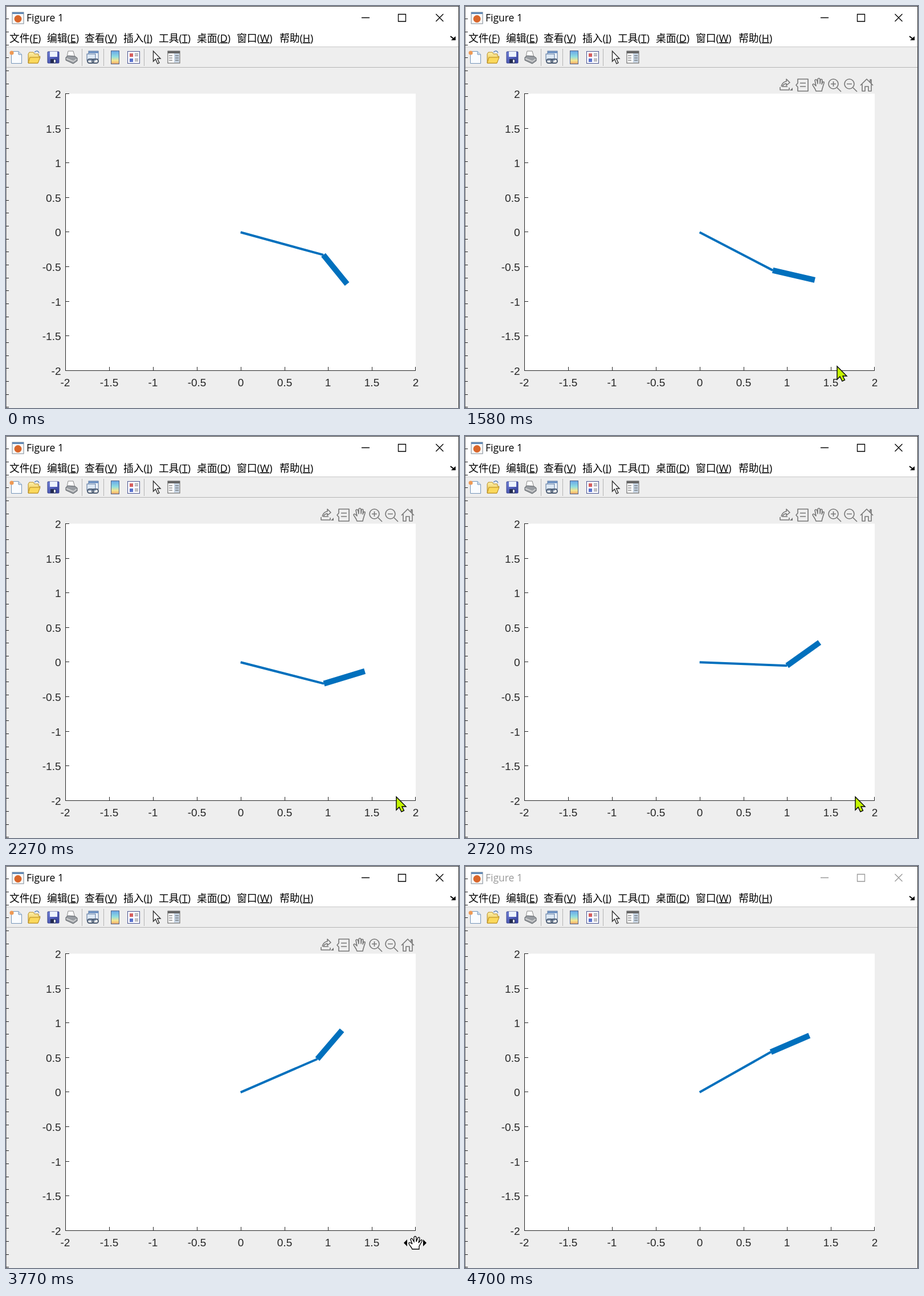
An HTML page that plays this animation: 795 by 704 pixels, repeating every 4.74 s.

```html
<!DOCTYPE html>
<html lang="zh">
<head>
<meta charset="utf-8">
<title>Figure 1</title>
<style>
html, body { margin: 0; width: 100%; height: 100%; overflow: hidden; background: #eee; }
svg { display: block; width: 795px; height: 704px; }
.ui { font: 17.8px "Open Sans", "Noto Sans CJK SC", "Noto Sans CJK", sans-serif; fill: #000; }
.tick text { font: 19px "Liberation Sans", Arial, sans-serif; fill: #262626; }
.u { text-decoration: underline; }
.line { fill: none; stroke: #262626; stroke-width: 1; shape-rendering: crispEdges; }
.arm { stroke: #0070bd; fill: none; }
#tools { fill: none; stroke: #777; stroke-width: 1.6; stroke-linejoin: round; }
#title { color: #000; }
#title.off { color: #999; }
</style>
</head>
<body>
<svg viewBox="0 0 795 704">
  <defs>
    <linearGradient id="bar" x2="0" y2="1">
      <stop stop-color="#68a5e8"/><stop offset=".45" stop-color="#8fdde0"/>
      <stop offset=".75" stop-color="#f8e58c"/><stop offset="1" stop-color="#eda265"/>
    </linearGradient>
    <linearGradient id="fold" x2="0" y2="1">
      <stop stop-color="#fff3ae"/><stop offset="1" stop-color="#e5b52f"/>
    </linearGradient>
    <linearGradient id="disk" x2="1" y2="1">
      <stop stop-color="#7181d8"/><stop offset="1" stop-color="#303b98"/>
    </linearGradient>
  </defs>

  <rect width="795" height="704" fill="#eee"/>
  <rect width="795" height="71" fill="#fff"/>
  <path d="M0 71.5H795" stroke="#c8c8c8"/>
  <path d="M0 107.5H795" stroke="#b4b4b4"/>
  <path d="M0 .5H795M794.5 0V704" stroke="#333"/>
  <path d="M.5 0V704" stroke="#888"/>
  <path id="edge" class="line"/>

  <g id="title">
    <rect x="11" y="11" width="20" height="20" fill="#f8f8f8" stroke="#7d8791"/>
    <path d="M11 12.5H31" stroke="#5f87b5" stroke-width="3"/>
    <circle cx="21" cy="22.5" r="6.5" fill="#d9662b"/>
    <text class="ui" x="36" y="27" style="font-size:17.5px;fill:currentColor">Figure 1</text>
    <path d="M624 20.5H638M688.5 14.5H701.5V27H688.5ZM754.5 14L767.5 27M767.5 14L754.5 27"
      fill="none" stroke="currentColor" stroke-width="1.3"/>
  </g>
  <g id="menu" class="ui"></g>
  <path d="M780 53L785 57" stroke="#000" stroke-width="2"/>
  <path d="M789 53V60H781Z"/>

  <g id="toolbar">
    <path d="M133.5 75V105M171.5 75V105M242.5 75V105" stroke="#b5b5b5"/>
    <path d="M9.5 79.5H22L27.5 85V100.5H9.5Z" fill="#f9fcff" stroke="#7595b8"/>
    <path d="M22 79.5V85H27.5" fill="#c8dcf2" stroke="#7595b8"/>
    <circle cx="10" cy="82" r="3.6" fill="#ee9a55"/>
    <path d="M39 99V84L41 81H48L50 84H57V88H60L56 100H39Z" fill="url(#fold)" stroke="#b68b20"/>
    <path d="M42 90H60L56 100H39Z" fill="#fbd95c" stroke="#b68b20"/>
    <path d="M50 81Q55 76 58 82" fill="none" stroke="#5d86bd" stroke-width="1.6"/>
    <rect x="73" y="80" width="20" height="20" rx="1" fill="url(#disk)" stroke="#35408e"/>
    <path d="M77 80H90V89H77Z" fill="#edf3ff"/>
    <path d="M78 93H88V100H78Z" fill="#222b50"/>
    <path d="M84 94H87V99H84Z" fill="#e2e5ee"/>
    <path d="M107 89L109 79H118L121 90Z" fill="#fff" stroke="#888"/>
    <path d="M105 90L109 87L121 88L125 91V96L118 101L105 95Z" fill="#999da2" stroke="#5c6166"/>
    <path d="M106 92L118 97L124 93" fill="none" stroke="#ddd" stroke-width="1.5"/>
    <rect x="145" y="79" width="17" height="14" fill="#f4f8fc" stroke="#52719a"/>
    <path d="M145 81H162" stroke="#5f87bd" stroke-width="3"/>
    <rect x="142" y="84" width="15" height="11" fill="#dce8f4" stroke="#52719a"/>
    <g fill="none" stroke="#4d5d73" stroke-width="2">
      <rect x="143" y="93" width="11" height="7" rx="3.5"/>
      <rect x="151" y="93" width="11" height="7" rx="3.5"/>
    </g>
    <rect x="184.5" y="78.5" width="14" height="23" fill="url(#bar)" stroke="#516186"/>
    <rect x="213.5" y="79.5" width="21" height="21" fill="#fafaff" stroke="#4a5590"/>
    <path d="M217 83H223V89H217Z" fill="#d75d5d"/>
    <path d="M217 92H223V98H217Z" fill="#5871cc"/>
    <path d="M226 84H232M226 87H232M226 93H232M226 96H232" stroke="#555"/>
    <path d="M258.5 79V97L262.5 93L266 101L269 99.5L265.5 92H271Z" fill="#fff" stroke="#333" stroke-width="1.4"/>
    <rect x="284" y="79" width="21" height="21" fill="#fff" stroke="#555"/>
    <path d="M284 81H305" stroke="#666" stroke-width="4"/>
    <path d="M295 83H304V99H295Z" fill="#c6d4e3"/>
    <path d="M286 87H292M286 91H292M286 95H292M297 87H303M297 91H303M297 95H303" stroke="#555"/>
  </g>

  <rect x="104" y="153.5" width="615" height="485" fill="#fff"/>
  <path id="axes" class="line"/>
  <g id="labels" class="tick"></g>
  <path id="upper" class="arm" stroke-width="4"/>
  <path id="fore" class="arm" stroke-width="10"/>

  <g id="tools">
    <path d="M553 142V147H569V143M555 141Q557 133 564 132V128L570 134L564 139V136Q559 136 557 141H566"/>
    <path d="M570 148H575V143Z" fill="#777" stroke="none"/>
    <path d="M584 128H602V149H584V142L581 138.5L584 135ZM588 135H598M588 141H598"/>
    <path d="M616 149C614 143 611 141 610 138Q611 135 614 138L616 140L614 130Q616 127 618 131L619 136V128Q621 125 623 128V136L624 129Q627 127 627 131L626 137L628 133Q631 132 630 135L627 145L626 149Z"/>
    <circle cx="646.5" cy="136.5" r="8.5"/>
    <path d="M642 136.5H651M646.5 132V141M653 143L660 150"/>
    <circle cx="674.5" cy="136.5" r="8.5"/>
    <path d="M670 136.5H679M681 143L688 150"/>
    <path d="M694 139L705 128L716 139M697 137V149H702V141H708V149H713V137M711 133V129H713V136"/>
  </g>

  <path id="arrow" d="M0 0V23L5 18L9 26L13.5 24L10 17H17Z" fill="#c4f500" stroke="#000" stroke-width="1.4"/>
  <g id="hand">
    <path d="M-5 11C-6 7 -12 3 -11 0Q-9 -2 -5 2L-8 -6Q-7 -9 -5 -7L-2 -2V-10Q0 -13 2 -10V-2L5 -9Q8 -11 8 -8L6 0L10 -5Q13 -6 12 -3L7 6V11Z"
      fill="#fff" stroke="#000" stroke-width="1.3"/>
    <path d="M-20 0L-14 -6V6ZM20 0L14 -6V6Z"/>
  </g>
</svg>
<script>
const $ = id => document.getElementById(id);
const LOOP = 4740, STEP = 40.513;
const px = x => 411.7 + x * 153.7;
const py = y => 396.3 - y * 121.2;

// Static parts
let d = '';
for (let y = 22.4; y < 704; y += 22.67) d += `M0 ${Math.round(y) + .5}H5`;
$('edge').setAttribute('d', d);

const menu = [[6, '文件', 'F'], [72, '编辑', 'E'], [138, '查看', 'V'], [206, '插入', 'I'],
  [268, '工具', 'T'], [335, '桌面', 'D'], [405, '窗口', 'W'], [480, '帮助', 'H']];
$('menu').innerHTML = menu.map(([x, name, key]) =>
  `<text x="${x}" y="62.5">${name}(<tspan class="u">${key}</tspan>)</text>`).join('');

let labels = '';
d = 'M104.5 153.5V638.5H719';
for (let v = -2; v <= 2; v += .5) {
  const x = Math.round(px(v)), y = Math.round(py(v));
  d += `M${x - (v === 2 ? .5 : -.5)} 638V632M104 ${y - .5}H110.5`;
  labels += `<text x="${x}" y="666" text-anchor="middle">${v}</text>` +
    `<text x="96.5" y="${y + 7}" text-anchor="end">${v}</text>`;
}
$('axes').setAttribute('d', d);
$('labels').innerHTML = labels;

// Linear track of [time, ...values]
function track(keys, t) {
  let i = 1;
  while (i < keys.length - 1 && keys[i][0] < t) i++;
  const a = keys[i - 1], b = keys[i];
  const f = Math.min(1, Math.max(0, (t - a[0]) / (b[0] - a[0])));
  return a.slice(1).map((v, j) => v + (b[j + 1] - v) * f);
}

// The simulation clock runs slightly unevenly
const phase = [[0, -58], [730, -19.7], [1580, 22.2], [1910, 39.7], [2720, 85.6], [3770, 143], [4700, 189]];
const pointer = [[800, 632, 706], [1040, 651, 631], [1580, 653, 631], [1720, 653, 631], [1910, 664, 604],
  [2150, 685, 632], [2800, 685, 632], [3200, 693, 633], [3340, 694, 634], [3520, 718, 660],
  [3960, 718, 660], [4150, 716, 706]];

const show = (id, on) => $(id).style.display = on ? '' : 'none';
const rad = Math.PI / 180;

function draw(t) {
  const p = track(phase, t)[0] * rad;
  const a = -36 * rad * Math.cos(p);
  const b = a + 45 * rad * Math.sin(p);
  const x = Math.cos(a), y = Math.sin(a);
  const elbow = `${px(x)} ${py(y)}`;
  $('upper').setAttribute('d', `M${px(0)} ${py(0)}L${elbow}`);
  $('fore').setAttribute('d', `M${elbow}L${px(x + Math.cos(b) / 2)} ${py(y + Math.sin(b) / 2)}`);

  const [cx, cy] = track(pointer, t);
  const inside = t >= 800 && t < 4150;
  const onRuler = t > 3340 && cy > 640 && cy < 680;
  show('arrow', inside && !onRuler);
  show('hand', inside && onRuler);
  show('tools', t >= 900 && t < 4380);
  for (const id of ['arrow', 'hand']) $(id).setAttribute('transform', `translate(${cx} ${cy})`);
  $('title').setAttribute('class', t >= 4600 ? 'off' : '');
}

// Hold each pose for 40 or 50 ms
function tick() {
  const t = Math.floor(performance.now() % LOOP / 10) * 10;
  const k = Math.ceil((t + 4) / STEP) - 1;
  draw(Math.floor((k * STEP + 6) / 10) * 10);
  requestAnimationFrame(tick);
}
tick();
</script>
</body>
</html>
```
